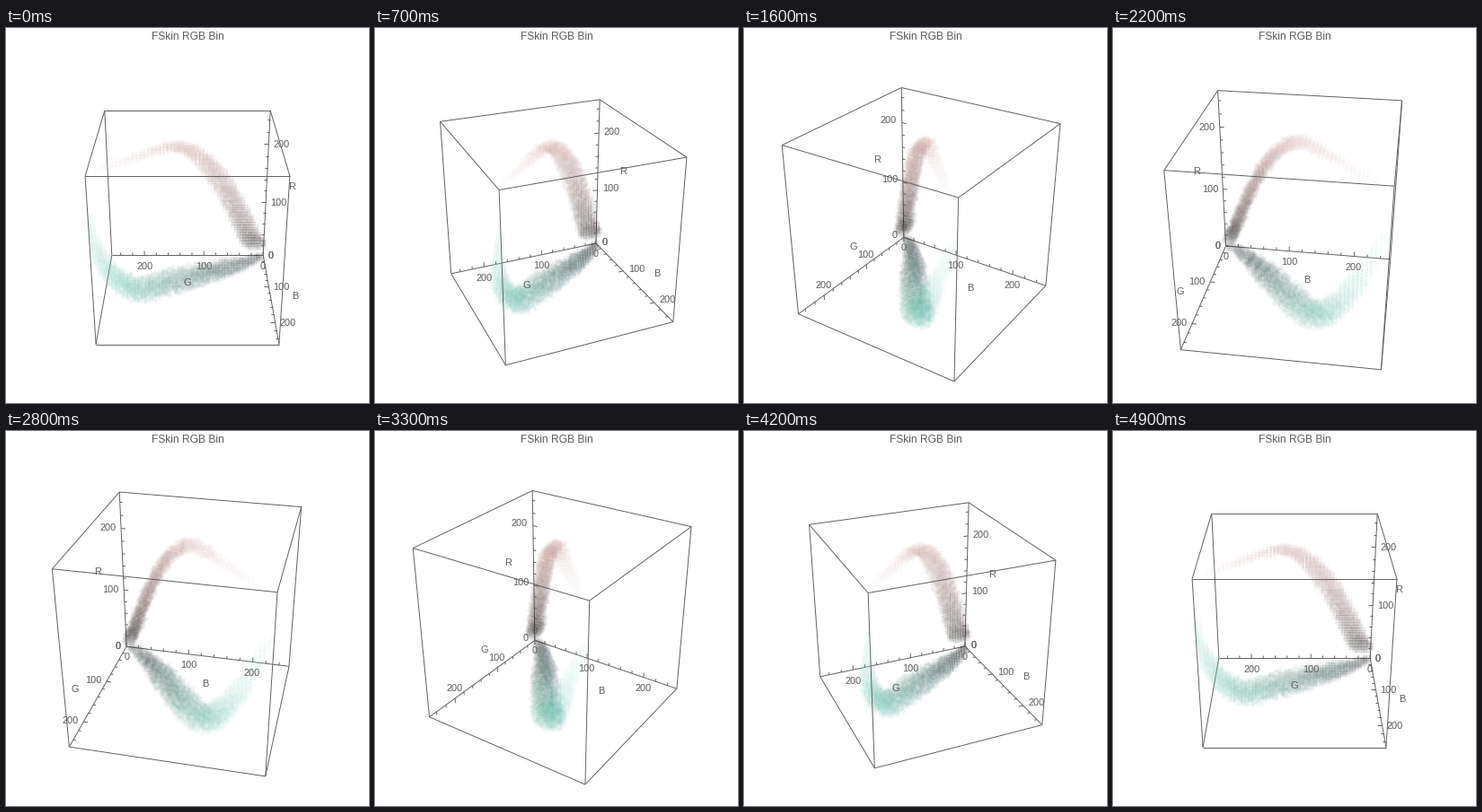
A matplotlib script for the animation above (5 s loop, 404x418 px).

```python
from itertools import product

import numpy as np
import matplotlib.pyplot as plt
from matplotlib.animation import FuncAnimation
from matplotlib.collections import LineCollection

W, H, DPI = 404, 418, 100
PX = 72 / DPI
FRAMES, STEP_MS = 50, 100
CENTER = np.array([W / 2, 215.8])
FOCAL = 866
BIN = 5
INK = "#5c5c5c"
FONT = "Liberation Sans"
AXES = np.eye(3)
rng = np.random.default_rng(4)


def camera(n):
    """Projection of unit-cube (R, G, B) points; the view swings out and back."""
    t = np.pi / 2 * min(n, FRAMES - 1 - n) / (FRAMES / 2 - 1)
    eye = np.array([2, 2 * np.sqrt(3) * np.sin(t), 4 * np.cos(t)])
    dist = np.linalg.norm(eye)
    fwd = eye / dist
    right = np.cross(AXES[0], fwd)
    right /= np.linalg.norm(right)
    up = np.cross(fwd, right)

    def project(p):
        q = np.asarray(p, float) - 0.5
        scale = FOCAL / (dist - q @ fwd)
        return CENTER + np.stack([q @ right * scale, -(q @ up) * scale], -1)

    return project, fwd


def cross2(a, b):
    return a[0] * b[1] - a[1] * b[0]


def skin_curve(t):
    rise = np.minimum(t / 0.75, 1)
    red = 28 + 225 * rise**2 * (3 - 2 * rise)
    return np.stack([red, 16 + 230 * t**1.6, 12 + 226 * t**1.6], -1)


def teal_curve(t):
    late = np.maximum(0, (t - 0.55) / 0.45)
    red = 3 + 24 * np.minimum(1, 2 * t) + 170 * late**1.5
    green = 5 + 250 * np.sin(np.pi / 2 * t) ** 1.15
    return np.stack([red, green, 5 + 245 * t**0.85], -1)


def cloud(curve, width, ratio, alpha, gray, count=10000):
    """Binned colours scattered in ellipsoids along a curve through RGB space."""
    t = rng.random(count)
    ball = rng.normal(size=(count, 3))
    ball *= rng.random((count, 1)) ** 0.45 / np.linalg.norm(ball, axis=1, keepdims=True)
    rgb = curve(t) + ball * width(t)[:, None] * ratio
    bins, hits = np.unique(np.round(rgb / BIN) * BIN, axis=0, return_counts=True)
    pos = np.clip(bins, 0, 255) / 255
    muted = pos + gray * (0.9 * pos.mean(axis=1, keepdims=True) - pos)
    opacity = alpha * np.clip(0.5 + 0.2 * hits, 0, 1.5)
    return np.column_stack([pos, muted, opacity])


points = np.vstack([
    cloud(skin_curve, lambda t: 2 + 18 * (1 - t**4), (0.45, 1, 0.5), 0.045, 0.5),
    cloud(teal_curve, lambda t: 4 + 17 * np.sin(np.pi * t**0.9), (1, 1, 1.2), 0.045, 0.4),
])
spots, shades = points[:, :3], points[:, 3:]

corners = list(product((0, 1), repeat=3))
edges = [(a, b) for a, b in product(corners, corners)
         if a < b and sum(x != y for x, y in zip(a, b)) == 1]
near = [e for e in edges if (1, 1, 1) in e]
far = [e for e in edges if (1, 1, 1) not in e]

fig = plt.figure(figsize=(W / DPI, H / DPI), dpi=DPI, facecolor="white")
ax = fig.add_axes([0, 0, 1, 1])
ax.set(xlim=(0, W), ylim=(H, 0))
ax.axis("off")


def strokes(z):
    return ax.add_collection(
        LineCollection([], colors=INK, linewidths=0.95 * PX, zorder=z))


def label(text, size=11):
    return ax.text(0, 0, text, family=FONT, size=size * PX, color=INK,
                   ha="center", va="baseline", zorder=5)


back, front, ticks = strokes(1), strokes(3), strokes(4)
dots = ax.scatter(*spots[:, :2].T, s=(3.6 * PX) ** 2, marker="s",
                  linewidths=0, zorder=2)
title = label("FSkin RGB Bin", 12)
title.set_position((202.5, 13.4))
names = [label(c) for c in "RGB"]
numbers = [[label(str(v)) for v in (0, 100, 200)] for _ in names]


def place(text, at, out, gap, half_w):
    x, y = at + out * (gap + abs(out[0]) * half_w + abs(out[1]) * 6)
    text.set_position((x, y + 4))


def outward(project, axis):
    """Box direction that leads labels away from the centre most clearly."""
    start, end = project([0, 0, 0]), project(AXES[axis])
    run, mid = end - start, AXES[axis] / 2
    side = 1 if cross2(run, start - CENTER) > -1 else -1

    def lean(other):
        d = project(mid + 0.05 * AXES[other]) - project(mid)
        return cross2(run, d / np.linalg.norm(d))

    # Near ties go to the vertical axis.
    other = max((i for i in range(3) if i != axis),
                key=lambda i: abs(lean(i)) * (1.02 if i == 0 else 1))
    return side * np.sign(lean(other)) * AXES[other]


def draw(n):
    project, fwd = camera(n)
    back.set_segments([project(e) for e in far])
    front.set_segments([project(e) for e in near])

    order = np.argsort(spots @ fwd)
    dots.set_offsets(project(spots[order]))
    dots.set_facecolors(shades[order])

    marks = []
    for axis in range(3):
        step = 0.02 * outward(project, axis)

        def anchor(f):
            p = project(f * AXES[axis])
            d = project(f * AXES[axis] + step) - p
            return p, d / np.linalg.norm(d)

        for v in range(0, 256, 20):
            p, out = anchor(v / 255)
            major = v % 100 == 0
            marks.append([p, p - out * (5 if major else 3)])
            if major:
                place(numbers[axis][v // 100], p, out, 5, 9 if v else 3.5)
        place(names[axis], *anchor(0.5), 24, 4)
    ticks.set_segments(marks)
    return [back, front, ticks, dots, *names, *sum(numbers, [])]


anim = FuncAnimation(fig, draw, frames=FRAMES, interval=STEP_MS,
                     repeat=True, repeat_delay=0, blit=False)
plt.show()
```
